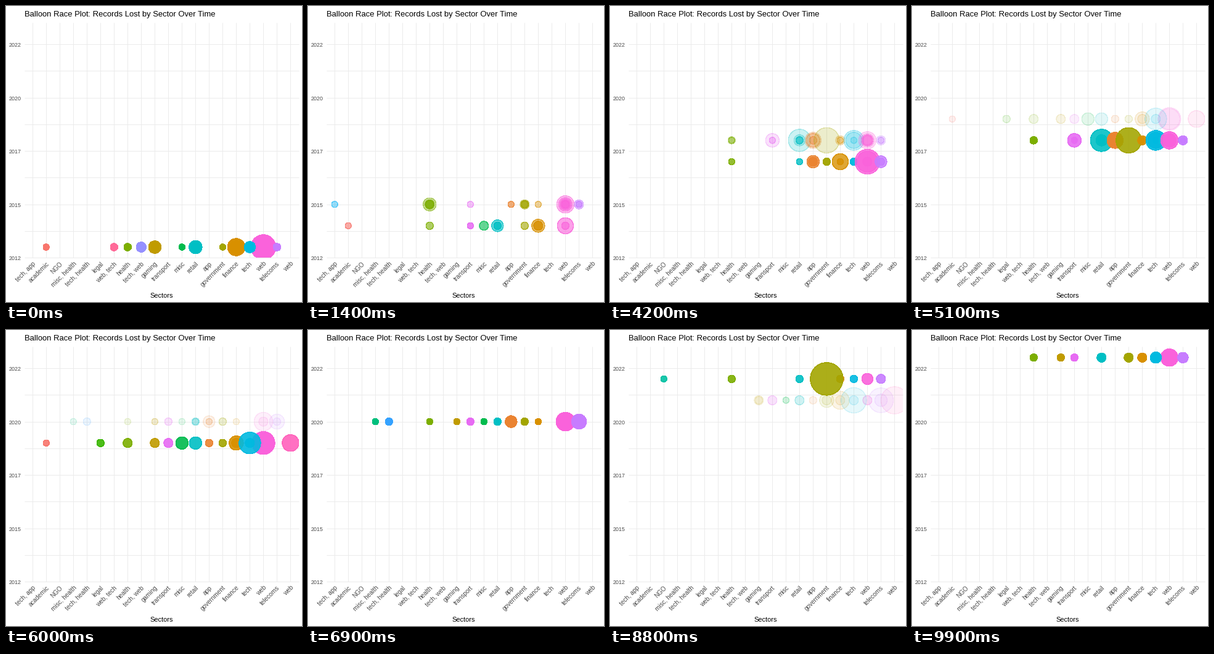
A matplotlib script that plays this animation: 480 by 480 pixels, repeating every 10000 ms.

```python
import matplotlib.pyplot as plt
from matplotlib.animation import FuncAnimation
from matplotlib.patches import Circle, Rectangle

plt.rcParams["font.family"] = "Liberation Sans"

SIZE, DPI, FRAMES = 480, 72, 100
LEFT, RIGHT, TOP, BOTTOM = 30, 474.6, 27.4, 408.3
STEP_X = (RIGHT - LEFT) / 20.2
STEP_Y = (BOTTOM - TOP) / 11
GRID, GREY = "#EBEBEB", "#4D4D4D"

SECTORS = ["tech, app", "academic", "NGO", "misc, health", "tech, health",
           "legal", "web, tech", "health", "tech, web", "gaming", "transport",
           "misc", "retail", "app", "government", "finance", "tech", "web",
           "telecoms", "web "]

HUES = dict(zip(
    sorted(SECTORS, key=str.lower),
    ["#F8766D", "#EA8331", "#D89000", "#C09B00", "#A3A500",
     "#7CAE00", "#39B600", "#00BB4E", "#00BF7D", "#00C1A3",
     "#00BFC4", "#00BAE0", "#00B0F6", "#35A2FF", "#9590FF",
     "#C77CFF", "#E76BF3", "#FA62DB", "#FF62BC", "#FF6A98"]))

# Common balloon radii
S, M, L = 6, 7, 8.3

# Balloon radii per sector, in drawing order
BALLOONS = {
    2013: {"academic": [S], "web, tech": [M], "health": [M], "tech, web": [9],
           "gaming": [11], "misc": [S], "retail": [11.5], "government": [S],
           "finance": [15], "web": [21, 10], "tech": [10], "telecoms": [M]},
    2014: {"academic": [S], "health": [M], "transport": [S, S], "misc": [L],
           "retail": [10.5, M, M], "government": [M], "finance": [11.5, L, L],
           "web": [14, M]},
    2015: {"tech, app": [S], "health": [11.5, L, L, M, M], "transport": [S],
           "app": [S, S], "government": [L, M, M, S], "finance": [S],
           "web": [15, 12, 10, L, M, M], "telecoms": [L, S, S]},
    2016: {"health": [M, S], "gaming": [M], "misc": [L, M], "retail": [S],
           "app": [L], "government": [10.5, M], "finance": [S],
           "telecoms": [S], "web": [21, 20, 13]},
    2017: {"health": [S], "retail": [S], "app": [11, L, L],
           "government": [M, S], "finance": [14, S], "tech": [M, S],
           "web": [21, 18, L], "telecoms": [10.5, M]},
    2018: {"health": [M, S, S, S], "transport": [12, S, S],
           "retail": [19, 10, M, M, M, S], "app": [14, 12, 12, M, M],
           "government": [21.5], "finance": [L, S, S],
           "tech": [17, 14, S], "web": [15, 12, 10, 10, 10, L, L],
           "telecoms": [L, S, S]},
    2019: {"academic": [S], "legal": [M], "health": [L], "gaming": [L],
           "transport": [L], "misc": [11], "retail": [11], "app": [M],
           "government": [M], "finance": [12.5, L], "web": [19.5, 18],
           "tech": [18.5, L], "web ": [14.5]},
    2020: {"misc, health": [S], "tech, health": [M], "health": [S],
           "gaming": [S, S], "transport": [M, M], "misc": [S],
           "retail": [M, M, S, S], "app": [10.5, S, S], "government": [M, M],
           "finance": [S], "web": [16, L], "telecoms": [13, M]},
    2021: {"gaming": [L, M], "transport": [L, L], "misc": [S, S],
           "retail": [L, L], "app": [M], "government": [12.5, L],
           "finance": [15.5, L], "web": [L, L], "tech": [21.5, L],
           "telecoms": [21, 11], "web ": [23]},
    2022: {"NGO": [S], "health": [M], "retail": [M], "finance": [M],
           "government": [27.5], "tech": [M], "web": [10], "telecoms": [L]},
    2023: {"health": [M], "gaming": [M], "transport": [M],
           "retail": [L], "government": [L], "finance": [L],
           "web": [15], "tech": [10], "telecoms": [9.5]},
}
KEYS = [round((FRAMES - 1) * i / 10) for i in range(11)]


def x_of(sector):
    return LEFT + STEP_X * (0.6 + SECTORS.index(sector))


def y_of(year):
    return BOTTOM - STEP_Y * (year - 2012.5)


fig = plt.figure(figsize=(SIZE / DPI, SIZE / DPI), dpi=DPI, facecolor="white")
ax = fig.add_axes([0, 0, 1, 1])
ax.set(xlim=(0, SIZE), ylim=(SIZE, 0))
ax.axis("off")
panel = Rectangle((LEFT, TOP), RIGHT - LEFT, BOTTOM - TOP,
                  transform=ax.transData)


def grid_line(xs, ys):
    ax.plot(xs, ys, color=GRID, lw=1, zorder=0, solid_capstyle="butt")


for i in range(9):
    year = 2012.5 + 1.25 * i
    y = y_of(year)
    grid_line([LEFT, RIGHT], [y, y])
    if i % 2 == 0:
        ax.text(25, y + 4, str(int(year)), size=9, color=GREY, ha="right")

for name in SECTORS:
    x = x_of(name)
    grid_line([x, x], [TOP, BOTTOM])
    ax.text(x + 5.2, BOTTOM + 10.2, name.strip(), size=10, color=GREY,
            rotation=45, rotation_mode="anchor", ha="right", va="baseline")

ax.text(LEFT - 0.5, 17, "Balloon Race Plot: Records Lost by Sector Over Time",
        size=13.05)
ax.text((LEFT + RIGHT) / 2, 473, "Sectors", size=11, ha="center")


def make_row(year, sectors):
    row = []
    for name, radii in sectors.items():
        for r in radii:
            # Aliased drawing grows each disc by about half a pixel
            dot = Circle((x_of(name), y_of(year)), r - 1, color=HUES[name],
                         lw=0.4, antialiased=False, visible=False, zorder=2)
            ax.add_patch(dot)
            dot.set_clip_path(panel)
            row.append(dot)
    return row


rows = [make_row(*item) for item in BALLOONS.items()]


def opacity(i, frame):
    """Linear fade in from the previous key and out to the next one."""
    key = KEYS[i]
    if frame == key:
        return 1
    j = i + 1 if frame > key else i - 1
    if not 0 <= j < len(KEYS):
        return 0
    return max(0, 1 - (frame - key) / (KEYS[j] - key))


def update(frame):
    for i, row in enumerate(rows):
        alpha = opacity(i, frame)
        for dot in row:
            dot.set_visible(alpha > 0)
            dot.set_alpha(alpha)
    return [dot for row in rows for dot in row]


anim = FuncAnimation(fig, update, frames=FRAMES, interval=100, repeat=True,
                     repeat_delay=0, blit=False)
plt.show()
```
